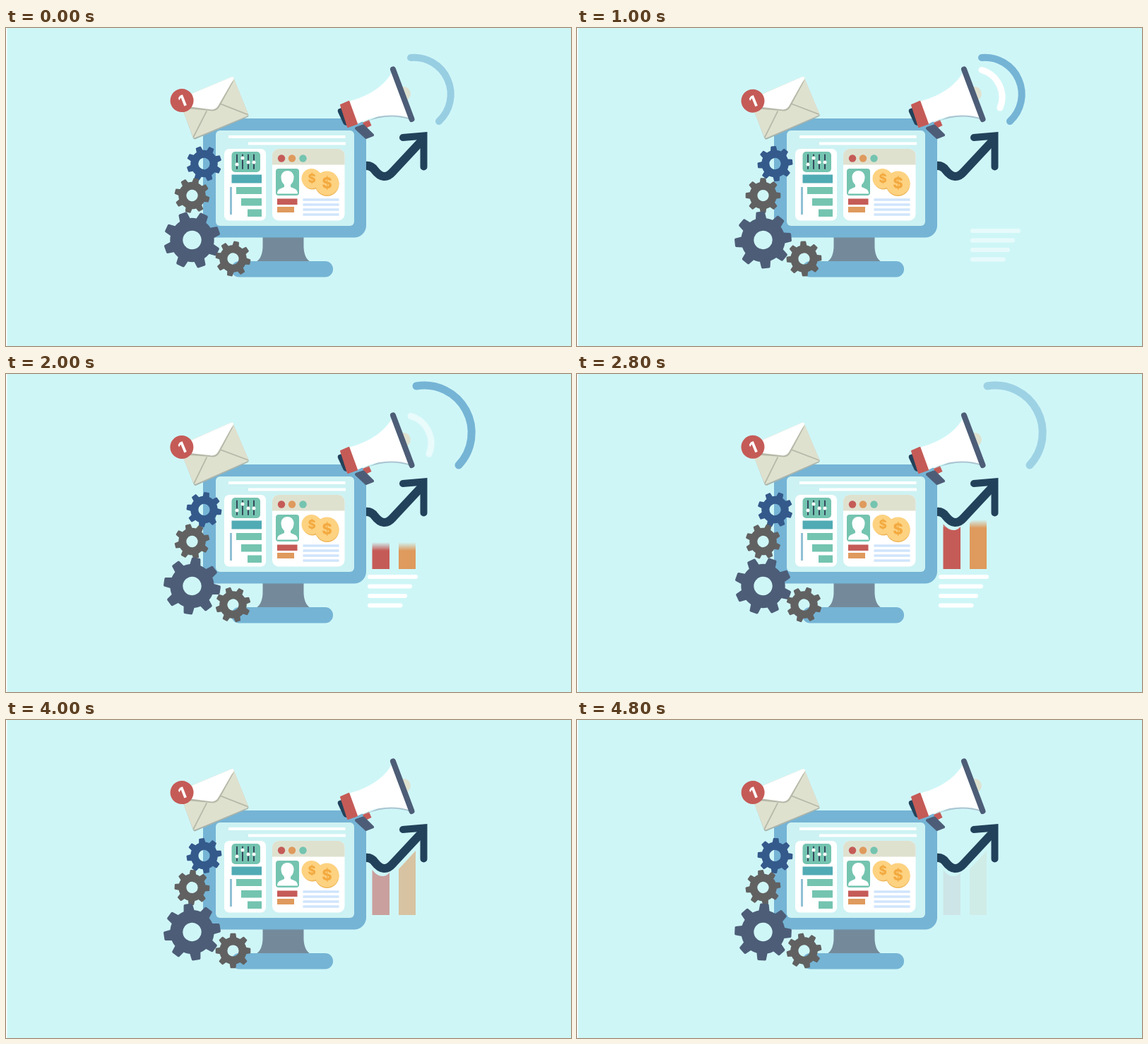
Recreate the animation shown at these times as an HTML page. Size 800 by 450 pixels, loop 5 s.

```html
<!DOCTYPE html>
<html lang="en">
<head>
<meta charset="utf-8">
<title>Marketing dashboard</title>
<style>
html, body { margin: 0; width: 100%; height: 100%; overflow: hidden; background: #cff6f7; }
svg { display: block; width: 100vw; height: 100vh; }
text { font-family: Inter, "Open Sans", sans-serif; font-weight: 800; text-anchor: middle; }
.blue { fill: #75b4d5; }
.red { fill: #c55b57; }
.orange { fill: #df9a5d; }
.green { fill: #74c4b0; }
.beige { fill: #dfe1cf; }
.white { fill: #fff; }
.slate { fill: #4d5d77; }
.line { fill: none; stroke-linecap: round; }
</style>
</head>
<body>
<svg viewBox="0 0 800 450">
  <defs>
    <linearGradient id="soft" x2="0" y2="1">
      <stop offset="0" stop-color="#000"/>
      <stop offset=".06" stop-color="#fff"/>
    </linearGradient>
    <mask id="wipe" maskUnits="userSpaceOnUse" x="500" y="150" width="100" height="140">
      <rect id="front" x="500" width="100" height="200" fill="url(#soft)"/>
    </mask>
    <clipPath id="card"><rect x="377" y="171" width="102.500" height="101.500" rx="9"/></clipPath>
  </defs>

  <rect width="800" height="450" fill="#cff6f7"/>
  <rect width="1.500" height="450" class="white"/>

  <!-- chart -->
  <g id="bars"><g mask="url(#wipe)">
    <path class="red" d="M518.500 276V212Q526 222 535 221Q540 220 543 216V276Z"/>
    <path class="orange" d="M556 276V211L580 185V276Z"/>
  </g></g>
  <path id="lines" class="line" stroke="#fff" stroke-width="6"
    d="M515 287H580M515 300.500H572M515 314H565M515 327.500H558.500"/>
  <g class="line" stroke="#22425b">
    <path stroke-width="12" d="M509 195Q517 194 522 201Q535 218 548 203L590 158"/>
    <path stroke-width="10" d="M562 155L591.500 152.500V196.500"/>
  </g>

  <!-- sound waves -->
  <g class="line">
    <path id="near" stroke="#fff" stroke-width="9" d="M573 59.500A40 40 0 0 1 599 113"/>
    <path id="mid" stroke="#75b4d5" stroke-width="10" d="M573 42A52 52 0 0 1 613 132"/>
    <path id="far" stroke="#75b4d5" stroke-width="11" d="M581 17A67 67 0 0 1 641 129"/>
  </g>

  <!-- monitor -->
  <path fill="#748a9b" d="M363.500 295H421.500V306Q421 325 431 331H354Q364 325 363.500 306Z"/>
  <rect class="blue" x="319" y="330" width="144" height="22.500" rx="11"/>
  <rect class="blue" x="279" y="128" width="231" height="168.500" rx="17"/>
  <rect x="297" y="145" width="196" height="135" rx="6" fill="#cdf2f3"/>
  <path stroke="#fff" stroke-width="4" d="M315 154H480.500M343 163.500H481"/>

  <rect class="white" x="309" y="171" width="59" height="101.500" rx="7"/>
  <rect class="green" x="319.500" y="175" width="40.500" height="29" rx="5"/>
  <path class="line" stroke="#34495c" stroke-width="2" d="M327 179.500V199M335 179.500V199M343 179.500V199M351 179.500V199"/>
  <g class="white">
    <circle cx="327" cy="193" r="2.500"/><circle cx="335" cy="184" r="2.500"/>
    <circle cx="343" cy="190" r="2.500"/><circle cx="351" cy="190" r="2.500"/>
  </g>
  <rect x="319.500" y="207.500" width="42.500" height="12" fill="#50abb4"/>
  <path class="green" d="M326 225H362V235H326ZM333 241H362V251.500H333ZM342 256.500H362V267H342Z"/>
  <path stroke="#8fbfd5" stroke-width="3" d="M318.500 225V264"/>

  <g clip-path="url(#card)">
    <rect class="white" x="377" y="171" width="103" height="102"/>
    <rect class="beige" x="377" y="171" width="103" height="22.500"/>
  </g>
  <circle class="red" cx="390" cy="184.500" r="5.200"/>
  <circle class="orange" cx="405" cy="184.500" r="5.200"/>
  <circle class="green" cx="420.500" cy="184.500" r="5.200"/>
  <rect class="green" x="382" y="199" width="33" height="38" rx="4"/>
  <path class="white" d="M394 222Q389 217 389.500 210Q391 202 398.500 202Q406 202 407.500 210Q408 217 403 222V225L410 228Q413 230 413 234.500H384Q384 230 387 228L394 225Z"/>
  <g fill="#efb75a"><circle cx="434" cy="214.500" r="14"/><circle cx="454.500" cy="221" r="17"/></g>
  <circle cx="432.500" cy="213" r="14" fill="#fdd281"/>
  <circle cx="454.500" cy="219.500" r="17" fill="#fdd281"/>
  <g fill="#f3aa40">
    <text x="433" y="219" font-size="17">$</text>
    <text x="454.500" y="227" font-size="22">$</text>
  </g>
  <rect class="red" x="384" y="241.500" width="28.500" height="8.500"/>
  <rect class="orange" x="384" y="253" width="24" height="8"/>
  <path stroke="#cfe5fb" stroke-width="3.500" d="M420.500 243H471.500M420.500 250H471.500M420.500 257H471.500M420.500 264H471.500"/>

  <!-- megaphone -->
  <circle class="beige" cx="563" cy="93" r="10"/>
  <path fill="#22425b" d="M478 112L471 114.500Q469 116 470 119L478 136Q480 138.500 484 138Z"/>
  <path class="red" d="M505 134L514 130L517.500 138L509 142Z"/>
  <path class="slate" stroke="#4d5d77" stroke-width="4" stroke-linejoin="round" d="M496 142L506 138.500L519 151.500L510 155Z"/>
  <path fill="#a9c5d1" d="M498 138Q538 118 573 130L560 110Z"/>
  <path class="white" d="M485 104Q530 92 547 62L573 128Q536 116 496 136.500Z"/>
  <path class="red" stroke="#c55b57" stroke-width="2" stroke-linejoin="round" d="M474 109L485.500 104L497 135.500L484 140Z"/>
  <path class="line" stroke="#4d5d77" stroke-width="8" d="M548 58.500L574.500 129"/>

  <!-- mail -->
  <g id="mail">
    <path fill="#a9b4ac" stroke="#a9b4ac" stroke-width="6" stroke-linejoin="round" d="M249 104L320 74L340.500 123L268 154.500Z"/>
    <path class="beige" stroke="#dfe1cf" stroke-width="6" stroke-linejoin="round" d="M248 102.500L319.500 72L340 121.500L267.500 152.500Z"/>
    <path class="line" stroke="#b7b9a9" stroke-width="1.800" d="M266 154L284 118M342 122L303 107"/>
    <path fill="#b7b9a9" d="M252 114L288 117Q298 119 302 112L323 73L316 80Z"/>
    <path class="white" d="M245 101L318 69.500Q322 68 322.500 71L301 109Q297 117 288 115L248 110Z"/>
    <circle class="red" cx="249" cy="103" r="16.500"/>
    <text class="white" font-size="22" transform="translate(249.500 103.500) rotate(-22)" y="8">1</text>
  </g>

  <g id="gears"></g>
</svg>
<script>
const $ = id => document.getElementById(id);
const LOOP = 5000, STEP = 200, TOOTH = 45;

// x, y, radius, colour, direction, time at which a tooth points straight up
const gears = [
  [280.5, 192, 25, "#34598b", 1, 1400],
  [263.5, 237, 25, "#616161", -1, 1000],
  [263.5, 300, 40.5, "#4d5d77", 1, 1400],
  [321.5, 326.5, 25, "#616161", -1, 800]
].map(([x, y, r, fill, dir, up]) => {
  const point = (deg, k) => {
    const a = deg * Math.PI / 180;
    return (r * k * Math.sin(a)).toFixed(2) + " " + (-r * k * Math.cos(a)).toFixed(2);
  };
  let d = "";
  for (let a = 0; a < 360; a += TOOTH)
    d += (a ? "L" : "M") + [[-14, .77], [-9, .98], [-7, 1], [7, 1], [9, .98], [14, .77]]
      .map(([o, k]) => point(a + o, k)).join("L") +
      `A${r * .77} ${r * .77} 0 0 1 ${point(a + TOOTH - 14, .77)}`;
  const h = r * .325;
  d += `ZM${-h} 0a${h} ${h} 0 1 0 ${2 * h} 0a${h} ${h} 0 1 0 ${-2 * h} 0Z`;
  const el = document.createElementNS("http://www.w3.org/2000/svg", "path");
  el.setAttribute("d", d);
  el.setAttribute("fill", fill);
  el.setAttribute("fill-rule", "evenodd");
  $("gears").append(el);
  return t => el.setAttribute("transform",
    `translate(${x} ${y}) rotate(${dir * TOOTH * (t - up) / 3200})`);
});

// linear interpolation through [time, value] pairs
function key(t, ...k) {
  if (t <= k[0][0]) return k[0][1];
  for (let i = 1; i < k.length; i++) {
    const [a, u] = k[i - 1], [b, v] = k[i];
    if (t <= b) return u + (v - u) * (t - a) / (b - a);
  }
  return k[k.length - 1][1];
}
const fade = (id, v) => $(id).setAttribute("opacity", v);
const move = (id, v) => $(id).setAttribute("transform", v);

function draw(t) {
  gears.forEach(turn => turn(t));
  move("mail", `rotate(${-.6 * Math.sin((t - 750) / LOOP * 2 * Math.PI)} 294 112)`);

  fade("near", key(t, [400, .1], [800, 1], [1800, 1], [2000, .55], [2400, .55], [2600, 0]) * (t >= 400));
  fade("mid", key(t, [0, .6], [400, 1], [1000, 1], [1400, .42], [1800, 0]));
  fade("far", key(t, [1000, 0], [1400, .7], [1600, 1], [2400, 1], [2800, .55], [3200, 0]));

  fade("lines", key(t, [800, 0], [1200, 1], [3600, 1], [4000, 0]));
  move("lines", `translate(${key(t, [1000, 45], [1200, 8], [1400, 0])} 0)`);

  $("front").setAttribute("y", 262 - .04 * (t - 1400));
  fade("bars", t < 1050 ? 0 : key(t, [3200, 1], [4000, .55], [4800, .1]));
}

function tick() {
  draw(Math.floor(performance.now() % LOOP / STEP) * STEP);
  requestAnimationFrame(tick);
}
tick();
</script>
</body>
</html>
```
